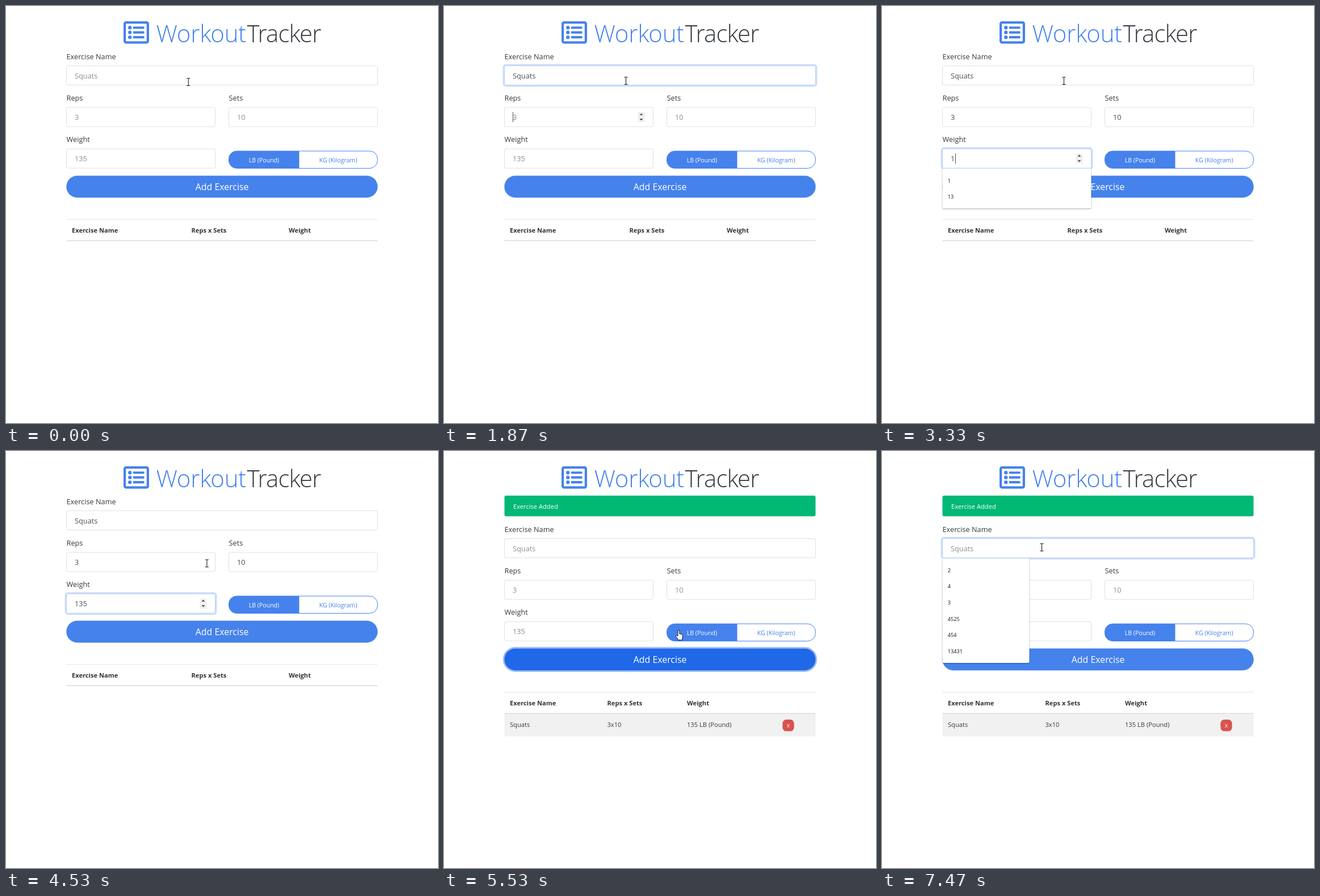
Recreate the animation shown at these times as an HTML page. Size 761x736 px, loop 8 s.

```html
<!DOCTYPE html>
<html lang="en">
<head>
<meta charset="utf-8">
<title>Exercise form</title>
<style>
  html, body { margin: 0; width: 100%; height: 100%; overflow: hidden; background: #fff; }
  svg { display: block; width: 761px; height: 736px; font: 12.75px "Open Sans", "Noto Sans", sans-serif; }
  text { white-space: pre; }
  .mid { text-anchor: middle; }
  .head { font-size: 42px; font-weight: 300; }
  .label { fill: #343a40; }
  .small { font-size: 10.56px; }
  .cell { font-size: 11.15px; fill: #343a40; }
  .th { font-weight: 700; fill: #2f3439; }
  .item { font-size: 9.2px; font-weight: 500; fill: #15181b; }
  .menu { filter: drop-shadow(0 1px 1.2px rgba(0, 0, 0, .35)); }
</style>
</head>
<body>
<svg id="stage" viewBox="0 0 761 736"></svg>
<script>
const LOOP = 8000, TICK = 200 / 3, BLINK = 530, FADE = 150;
const BLUE = '#4582ec', ADDED = 5460, SHIFT = 49;
const stage = document.getElementById('stage');

function el(tag, attrs, parent, text) {
  const node = document.createElementNS('http://www.w3.org/2000/svg', tag);
  set(node, attrs);
  if (text !== undefined) node.textContent = text;
  return parent.appendChild(node);
}
function set(node, attrs) {
  for (const key in attrs) node.setAttribute(key, attrs[key]);
}
const show = (node, on) => set(node, { visibility: on ? 'visible' : 'hidden' });
const write = (x, y, text, cls, parent, more) =>
  el('text', { x, y, class: cls, ...more }, parent, text);

const clamp = v => Math.min(1, Math.max(0, v));
const ease = v => { v = clamp(v); return v * v * (3 - 2 * v); };
const within = (t, [from, to]) => t >= from && t < to;
// Fades in after `from` and out after `to`.
const fade = (t, [from, to]) => ease((t - from) / FADE) - ease((t - to) / FADE);
const mix = (a, b, p) =>
  'rgb(' + a.map((v, i) => Math.round(v + (b[i] - v) * p)).join() + ')';

// Heading
const icon = el('g', { transform: 'translate(207 27) scale(.0879) translate(0 -32)', fill: BLUE }, stage);
el('rect', { x: 24, y: 56, width: 464, height: 400, rx: 26, fill: 'none', stroke: BLUE, 'stroke-width': 48 }, icon);
for (const cy of [160, 256, 352]) {
  el('circle', { cx: 128, cy, r: 36 }, icon);
  el('rect', { x: 192, y: cy - 24, width: 224, height: 48, rx: 12 }, icon);
}
write(264.5, 64, 'Workout', 'head', stage, { fill: BLUE, 'letter-spacing': -.3 });
write(424.5, 64, 'Tracker', 'head', stage, { fill: '#343a40', 'letter-spacing': -.9 });

const alertBox = el('g', {}, stage);
el('rect', { x: 106.5, y: 78.8, width: 548, height: 36.4, rx: 3, fill: '#02b875' }, alertBox);
write(122, 101.5, 'Exercise Added', 'cell', alertBox, { style: 'fill:#fff' });

const form = el('g', {}, stage);

// Fields: label, place, hint, typing times and focus spans
const fields = [
  { label: 'Exercise Name', x: 106.5, y: 105.5, w: 548, hint: 'Squats', menuW: 153,
    keys: [870, 1130, 1200, 1330, 1530, 1600], focus: [[130, 1870], [6940, 9e9]] },
  { label: 'Reps', x: 106.5, y: 179, w: 262, hint: '3', spin: true,
    keys: [2070], focus: [[1870, 2270]] },
  { label: 'Sets', x: 392.5, y: 179, w: 262, hint: '10', spin: true,
    keys: [2600, 2670], focus: [[2270, 2930]] },
  { label: 'Weight', x: 106.5, y: 252.2, w: 262, hint: '135', spin: true,
    keys: [3330, 3600, 3800], focus: [[2930, 5270]] }
];
const H = 34;

for (const f of fields) {
  const { x, y, w } = f;
  write(x, y - 12, f.label, 'label', form);
  f.ring = el('rect', { x: x - 1.6, y: y - 1.6, width: w + 3.2, height: H + 3.2, rx: 4.2, fill: 'none', stroke: BLUE, 'stroke-width': 2.7 }, form);
  f.box = el('rect', { x, y, width: w, height: H, rx: 2.7, fill: '#fff' }, form);
  f.text = write(x + 14.5, y + 22, '', '', form);
  f.caret = el('rect', { y: y + 8, width: 1, height: 18, fill: '#495057' }, form);
  f.arrows = el('g', { transform: `translate(${x + w - 21} ${y + 17})` }, form);
  el('rect', { x: -6, y: -9, width: 12, height: 18, fill: '#f0f0f0' }, f.arrows);
  el('path', { d: 'M-3 -3.4L0 -6.6L3 -3.4ZM-3 3L0 6.2L3 3Z', fill: '#444' }, f.arrows);
}

// Unit switch
el('path', { d: 'M516 256H406.5a14 14 0 0 0-14 14v2.5a14 14 0 0 0 14 14H516Z', fill: BLUE, stroke: BLUE }, form);
el('path', { d: 'M516 256H640.5a14 14 0 0 1 14 14v2.5a14 14 0 0 1-14 14H516Z', fill: '#fff', stroke: BLUE }, form);
write(454.5, 275.5, 'LB (Pound)', 'small mid', form, { fill: '#fff' });
write(585.2, 275.5, 'KG (Kilogram)', 'small mid', form, { fill: BLUE });

// Button
const glow = el('rect', { x: 105.1, y: 298.1, width: 550.8, height: 41.4, rx: 20.7, fill: 'none', stroke: BLUE, 'stroke-width': 2.8 }, form);
const button = el('rect', { x: 106.3, y: 299.4, width: 548.4, height: 38.8, rx: 19.4 }, form);
write(380.6, 325.2, 'Add Exercise', 'mid', form, { fill: '#fff', 'font-size': 15.9 });

// Table
el('rect', { x: 106.5, y: 376.2, width: 548, height: 1, fill: '#e2e2e2' }, form);
el('rect', { x: 106.5, y: 413.5, width: 548, height: 1.6, fill: '#dcdcdc' }, form);
write(116, 400, 'Exercise Name', 'cell th', form);
const heads = [['Reps x Sets', 326.5, 287.5], ['Weight', 498, 428]].map(
  ([text, wide, tight]) => ({ wide, tight, node: write(wide, 400, text, 'cell th', form) }));
const row = el('g', {}, form);
el('rect', { x: 106.5, y: 415, width: 548, height: 39.6, fill: '#f1f1f1' }, row);
write(116, 438.3, 'Squats', 'cell', row);
write(287.5, 438.3, '3x10', 'cell', row);
write(428, 438.3, '135 LB (Pound)', 'cell', row);
el('rect', { x: 596.4, y: 425, width: 20.2, height: 20.6, rx: 6.5, fill: '#d9534f' }, row);
write(606.5, 438.8, 'x', 'small mid', row, { fill: '#fff' });

// Suggestion menus: field, visible span, items
const recent = ['2', '4', '3', '4525', '454', '13431'];
const menus = [
  [0, [260, 930], recent],
  [0, [930, 1670], ['Squats']],
  [1, [2070, 2270], ['3', '31']],
  [2, [2600, 2670], ['1', '10']],
  [3, [3330, 3600], ['1', '13']],
  [0, [7070, 9e9], recent]
].map(([i, span, items]) => {
  const { x, y, w, menuW } = fields[i], top = y + H + .9;
  const node = el('g', { class: 'menu' }, form);
  el('rect', { x, y: top, width: menuW || w, height: 13 + 28.6 * items.length, rx: 2, fill: '#fff' }, node);
  items.forEach((text, n) => write(x + 9.3, top + 24.4 + 28.6 * n, text, 'item', node));
  return { node, span };
});

// Pointer
const pointer = el('g', {}, stage);
const shapes = {
  beam: el('path', { d: 'M-3 -6.5H-1Q0 -6.5 0 -5.5V5.5Q0 6.5 -1 6.5H-3M3 -6.5H1Q0 -6.5 0 -5.5M3 6.5H1Q0 6.5 0 5.5', fill: 'none', stroke: '#1c1c1c', 'stroke-width': 1.1 }, pointer),
  arrow: el('path', { d: 'M0 0V13.2L3 10.5L5 15L7.1 14L5.2 9.8H9Z', fill: '#fff', stroke: '#111', 'stroke-width': 1 }, pointer),
  hand: el('path', { d: 'M-1.6 10V1.4a1.5 1.5 0 0 1 3 0V6.4c.7-.7 1.8-.4 2 .5c.7-.5 1.7-.2 1.9.7c.8-.3 1.6.2 1.6 1.1V12.2c0 2-.9 3-1.2 5H-.7C-1.2 15-4.7 11.8-5.1 10.2c-.3-1.2 1-1.8 1.9-1z', fill: '#fff', stroke: '#111', 'stroke-width': 1 }, pointer)
};
const path = [
  [0, 321.3, 134], [69, 321.3, 134], [70, 320.5, 132], [4270, 320.5, 132], [4930, 413.5, 316.5],
  [6140, 413.5, 316.5], [6670, 293, 188], [6930, 281.5, 170], [LOOP, 281.5, 170]
];
function pointerAt(t) {
  const i = Math.max(1, path.findIndex(k => k[0] > t));
  const [t0, x0, y0] = path[i - 1], [t1, x1, y1] = path[i];
  const p = ease((t - t0) / (t1 - t0));
  return [x0 + (x1 - x0) * p, y0 + (y1 - y0) * p];
}
const inside = (px, py, x, y, w, h) => px >= x && px <= x + w && py >= y && py <= y + h;
function shapeAt(x, y) {
  if (fields.some(f => inside(x, y, f.x, f.y, f.w, H - 1))) return 'beam';
  if (inside(x, y, 392, 256, 263, 31) || inside(x, y, 106, 299, 549, 39)) return 'hand';
  return 'arrow';
}

const resets = fields.flatMap(f => [...f.keys, ...f.focus.map(s => s[0])]);

function draw(t) {
  const added = t >= ADDED, dy = added ? SHIFT : 0;
  set(form, { transform: `translate(0 ${dy})` });
  show(alertBox, added);
  show(row, added);
  for (const h of heads) set(h.node, { x: added ? h.tight : h.wide });

  const last = Math.max(...resets.filter(k => k <= t));
  const lit = Math.floor((t - last) / BLINK) % 2 === 0;
  for (const f of fields) {
    const typed = added ? '' : f.hint.slice(0, f.keys.filter(k => k <= t).length);
    const active = f.focus.some(s => within(t, s));
    const glowing = Math.max(...f.focus.map(s => fade(t, s)));
    f.text.textContent = typed || f.hint;
    set(f.text, { fill: typed ? '#495057' : '#8a9097' });
    set(f.ring, { 'stroke-opacity': .27 * glowing });
    set(f.box, { stroke: mix([224, 224, 224], [185, 208, 248], glowing) });
    const end = typed ? f.text.getComputedTextLength() + .4 : 0;
    set(f.caret, { x: Math.round(f.x + 14.5 + end) });
    show(f.caret, active && lit);
    show(f.arrows, active && f.spin);
  }

  set(button, { fill: mix([69, 130, 236], [31, 104, 232], fade(t, [4800, 6940])) });
  set(glow, { 'stroke-opacity': .5 * fade(t, [5380, 6940]) });
  for (const m of menus) show(m.node, within(t, m.span));

  const [x, y] = pointerAt(t), shape = shapeAt(x, y - dy);
  set(pointer, { transform: `translate(${x} ${y})` });
  for (const name in shapes) show(shapes[name], name === shape);
}

const start = performance.now();
function frame() {
  const t = (performance.now() - start) % LOOP;
  draw(Math.min(LOOP - 1, Math.floor((t + 4) / TICK) * TICK + 4));
  requestAnimationFrame(frame);
}
frame();
</script>
</body>
</html>
```
